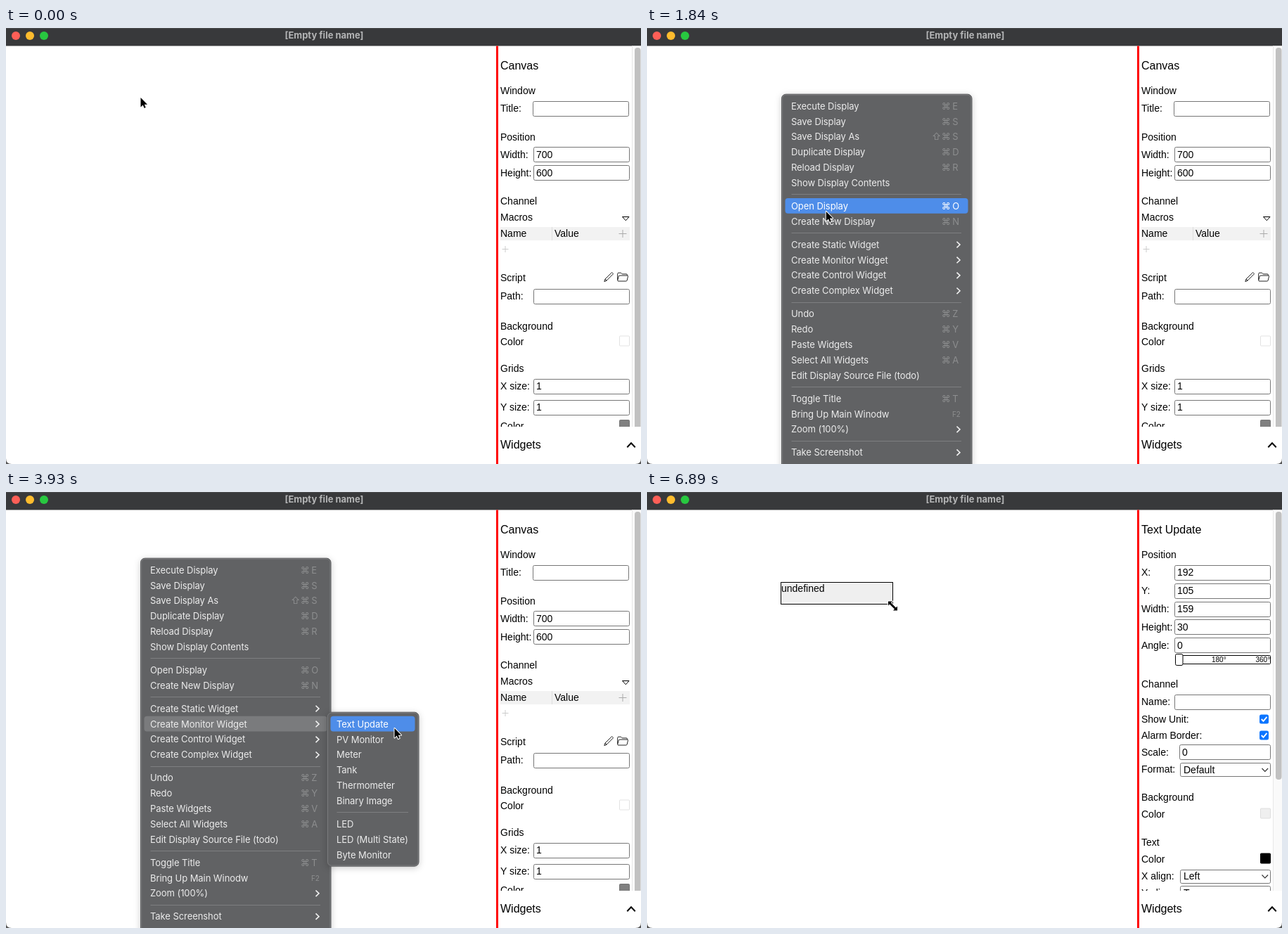
Write an HTML page that moves like this. It is 903 px wide and 620 px high and loops after 8 s.

```html
<!DOCTYPE html>
<html lang="en">
<head>
<meta charset="utf-8">
<title>Display editor</title>
<style>
  html, body { margin: 0; width: 100%; height: 100%; overflow: hidden; background: #fff; }
  svg { display: block; }
  text { white-space: pre; }
  .ui { font: 14px "Liberation Sans", Arial, sans-serif; }
  .menu { font: 13px Inter, "DejaVu Sans", sans-serif; letter-spacing: -.07px; fill: #ececec;
          filter: drop-shadow(0 2px 5px rgba(0, 0, 0, .2)); }
  .row rect { fill: none; }
  .row .key { fill: #8d8e8f; }
  .row.blue rect { fill: #4e8de9; }
  .row.gray rect { fill: #7a7b7d; }
  .row.blue, .row.blue .key { fill: #fff; }
</style>
</head>
<body>
<svg id="stage" width="903" height="620" viewBox="0 0 903 620"></svg>
<script>
const LOOP = 8000, STEP = 148, PITCH = 21.9, GAP = 10.93;
const stage = document.getElementById('stage');
const $ = id => document.getElementById(id);

// ---- drawing helpers (y is the vertical middle of a text line)
const text = (x, y, s, attrs = '', size = 14) =>
  `<text x="${x}" y="${y + size * .355}" ${attrs}>${s}</text>`;
const heading = (y, s) => text(703, y, s, 'font-size="16"', 16);
const labels = list => list.map(([y, s]) => text(703, y, s)).join('');
const rect = (x, y, w, h, attrs) =>
  `<rect x="${x}" y="${y}" width="${w}" height="${h}" ${attrs}/>`;
const line = (d, color, width = 1, attrs = '') =>
  `<path d="${d}" fill="none" stroke="${color}" stroke-width="${width}" ${attrs}/>`;
const plus = (x, y, r, color) => line(`M${x - r} ${y}h${2 * r}M${x} ${y - r}v${2 * r}`, color);
const field = (y, value = '', x = 750.5, id = '', right = 886.5) =>
  rect(x, Math.floor(y - 10.5) + .5, right - x, 21, 'rx="2" fill="#fff" stroke="#767676"') +
  text(x + 3.5, y, value, id && `id="${id}"`);
const select = (y, value) =>
  rect(758.5, Math.floor(y - 9.5) + .5, 128, 19, 'rx="2" fill="#fff" stroke="#767676"') +
  text(763, y, value) + line(`M874.5 ${y - 2}l4.3 4.3 4.3 -4.3`, '#333', 1.2);
const checkbox = y => rect(871, y - 6.5, 13, 13, 'rx="2.5" fill="#0a75ff"') +
  line(`M873.8 ${y}l2.7 2.8 5 -6`, '#fff', 1.9);
const swatch = (y, fill, stroke) =>
  rect(872.5, y, 14, 14, `rx="1" fill="${fill}" stroke="${stroke}"`);
const thumb = h => rect(894, 28, 8.5, h, 'rx="4" fill="#c1c1c1"');

const canvasPanel = () => heading(53.5, 'Canvas') +
  labels([[89.5, 'Window'], [114.5, 'Title:'], [155, 'Position'], [180, 'Width:'], [206, 'Height:'],
    [246.5, 'Channel'], [269.5, 'Macros'], [355, 'Script'], [381.5, 'Path:'], [424.5, 'Background'],
    [446.5, 'Color'], [484.5, 'Grids'], [509.5, 'X size:'], [539.5, 'Y size:'], [566, 'Color']]) +
  field(114.5, '', 749.5, '', 885.5) + field(180, 700) + field(206, 600) + field(381.5) +
  field(509.5, 1) + field(539.5, 1) +
  line('M876.5 268.5h9.5l-4.7 5.3z', '#000') +
  rect(703, 283, 184, 19, 'fill="#f2f2f2"') + line('M776.5 283v19', '#dedede') +
  text(703, 292.5, 'Name') + text(780, 292.5, 'Value') +
  plus(877, 292.5, 5.5, '#aaa') + plus(710, 314.5, 4.5, '#ccc') +
  line('M850.8 360.6l1.2 -3.6 9.6 -9.4 2 2 -9.5 9.6zM852 357l2.2 2.2', '#222') +
  line('M869.7 358.5v-9q0 -1.3 1.3 -1.3h3.6l1.6 1.7h6q1.2 0 1.2 1.2v1M869.7 358.8l1.6 -5.8q.3 -1 1.3 -1h10.8q1.4 0 1.1 1.3l-1.4 5.7q-.3 1 -1.4 1h-10.8q-1.2 0 -1.2 -1.2z', '#222') +
  swatch(438, '#fff', '#e3e3e3') + swatch(557.5, '#808080', '#747474') + thumb(560);

const widgetPanel = () => heading(53.5, 'Text Update') +
  labels([[89.5, 'Position'], [114.5, 'X:'], [140.5, 'Y:'], [166.5, 'Width:'], [192, 'Height:'],
    [218, 'Angle:'], [273.5, 'Channel'], [298.5, 'Name:'], [323, 'Show Unit:'], [346, 'Alarm Border:'],
    [370, 'Scale:'], [394.5, 'Format:'], [434.5, 'Background'], [458, 'Color'], [498.5, 'Text'],
    [522.5, 'Color'], [546.5, 'X align:'], [570, 'Y align:']]) +
  field(114.5, 192) + field(140.5, 105) + field(166.5, 159, 750.5, 'wide') +
  field(192, 30, 750.5, 'high') + field(218, 0) + field(298.5) + field(370, 0, 757.5) +
  rect(755.5, 232.5, 131, 12, 'rx="1" fill="#fff" stroke="#000"') +
  rect(751.5, 230.5, 10.5, 16, 'rx="2" fill="#fff" stroke="#000"') +
  text(803, 238, '180°', 'font-size="10"', 10) + text(865.5, 238, '360°', 'font-size="10"', 10) +
  checkbox(323) + checkbox(346) + select(395, 'Default') + select(546.5, 'Left') + select(570, 'Top') +
  swatch(450, '#efefef', '#dedede') + swatch(514, '#000', '#000') + thumb(381);

// Rows are "label|keys"; "-" is a separator and ">" opens a submenu.
function menu(id, x, top, w, rows) {
  const right = x + w;
  let y = top + 17, body = '';
  for (const item of rows) {
    if (item === '-') {
      body += line(`M${x + 14.5} ${Math.round(y - 6) + .5}H${right - 15}`, '#7e7f81');
      y += GAP;
      continue;
    }
    const [name, keys = ''] = item.split('|');
    body += `<g class="row" data-y="${y}">` + rect(x + 5.5, y - 11.3, w - 11, 21.8, 'rx="4"') +
      text(x + 14, y, name, '', 13);
    if (keys === '>') body += line(`M${right - 21.5} ${y - 4.3}l4.5 4.3 -4.5 4.3`, '#f0f0f0', 1.6);
    else if (keys === 'F2') body += text(right - 28, y + .5, keys, 'class="key" font-size="10"', 10);
    else [...keys].reverse().forEach((c, i) =>
      body += text(right - [27.8, 43.2, 57][i], y, c, 'class="key"', 13));
    body += '</g>';
    y += PITCH;
  }
  const h = y - PITCH + 15.8 - top;
  return `<g class="menu" id="${id}">` +
    rect(x + .5, top + .2, w - .5, h, 'rx="6" fill="#616264" stroke="#5a5b5d"') +
    rect(x + 1.5, top + 1.2, w - 2.5, h - 2, 'rx="5" fill="none" stroke="#7b7c7e"') + body + '</g>';
}

const mainRows = ['Execute Display|⌘E', 'Save Display|⌘S', 'Save Display As|⇧⌘S', 'Duplicate Display|⌘D',
  'Reload Display|⌘R', 'Show Display Contents', '-', 'Open Display|⌘O', 'Create New Display|⌘N', '-',
  'Create Static Widget|>', 'Create Monitor Widget|>', 'Create Control Widget|>',
  'Create Complex Widget|>', '-', 'Undo|⌘Z', 'Redo|⌘Y', 'Paste Widgets|⌘V', 'Select All Widgets|⌘A',
  'Edit Display Source File (todo)', '-', 'Toggle Title|⌘T', 'Bring Up Main Winodw|F2',
  'Zoom (100%)|>', '-', 'Take Screenshot|>', ''];
const staticRows = ['Label', 'Polyline', 'Arc', 'Rectangle', 'Media', 'Symbol', 'Text Symbol'];
const monitorRows = ['Text Update', 'PV Monitor', 'Meter', 'Tank', 'Thermometer', 'Binary Image', '-',
  'LED', 'LED (Multi State)', 'Byte Monitor'];

const outlined = 'stroke="#fff" stroke-width="2" stroke-linejoin="round" paint-order="stroke"';
stage.innerHTML = `
  <g class="ui">
    ${rect(0, 0, 903, 25.5, 'fill="#38393b"')}${line('M0 .5H903', '#4a4b4d')}
    ${['#fe5f57', '#febc2e', '#28c840'].map((c, i) =>
      `<circle cx="${14 + 20 * i}" cy="11" r="6" fill="${c}"/>`).join('')}
    ${text(452.5, 10.5, '[Empty file name]', 'text-anchor="middle" fill="#b4b5b6" font-family="Inter, sans-serif" font-weight="700" font-size="13"', 13)}
    <svg width="903" height="567">
      ${rect(890, 25.5, 13, 542, 'fill="#fafafa"')}${line('M890.5 25.5V567', '#e8e8e8')}
      <g id="canvasPanel">${canvasPanel()}</g>
      <g id="widgetPanel">${widgetPanel()}</g>
    </svg>
    ${rect(697, 25.5, 3, 595, 'fill="#f00"')}
    ${heading(592.5, 'Widgets')}
    ${line('M883.3 596.3l5.7 -6 5.7 6', '#000', 2)}
    <g id="widget">
      <rect id="box" x="190.5" y="128.5" fill="#efefef" stroke="#000"/>
      ${text(191, 137.5, 'undefined')}
    </g>
  </g>
  ${menu('main', 191, 94, 271, mainRows)}
  ${menu('static', 456, 291, 103.5, staticRows)}
  ${menu('monitor', 456, 313, 131, monitorRows)}
  <path d="M0 612q0 8 8 8h-8zM903 612q0 8 -8 8h8z" fill="#555"/>
  <g id="pointer">
    <path id="arrow" d="M.5 1V14.5L3.7 11.5 5.7 16 7.7 15.1 5.8 10.7H10Z" ${outlined}/>
    <path id="cross" d="M-6.5 0h13M0 -6.5v13" stroke="#000"/>
    <path id="resize" d="M-6.5 -6.5h6l-2 2 7 7 2 -2v6h-6l2 -2 -7 -7 -2 2z" ${outlined}/>
  </g>`;

// Pointer moves: start time, number of steps, end x, end y.
const moves = [[0, 1, 191, 98], [800, 2, 197, 104], [1400, 1, 214, 170], [1540, 7, 282, 322],
  [2590, 8, 544, 334], [3780, 2, 552, 335], [4680, 7, 190.5, 133.5], [5700, 1, 190.5, 130.5],
  [6000, 1, 194.5, 131.5], [6150, 6, 349.5, 162]];

function pointerAt(t) {
  const i = moves.findLastIndex(m => m[0] <= t);
  const [start, n, x, y] = moves[i], [, , fromX, fromY] = moves[Math.max(0, i - 1)];
  const k = Math.min(n, 1 + Math.floor((t - start) / STEP));
  const e = 1 - (1 - k / n) ** 1.6;
  return [fromX + (x - fromX) * e, fromY + (y - fromY) * e];
}

const show = (id, on) => $(id).style.display = on ? '' : 'none';
const menuRows = id => [...$(id).querySelectorAll('.row')];
const rowsOf = { main: menuRows('main'), monitor: menuRows('monitor') };
const hover = (id, y, tint) => rowsOf[id].forEach(r =>
  r.setAttribute('class', Math.abs(y - r.dataset.y) < 11 ? 'row ' + tint : 'row'));

function draw(t) {
  const [x, y] = pointerAt(t);
  const drawn = t >= 6150, fade = t >= 4530 ? .09 : 1;

  show('main', t >= 500 && t < 4680);
  show('static', t >= 2280 && t < 2428);
  show('monitor', t >= 2590 && t < 4680);
  $('main').style.opacity = $('monitor').style.opacity = fade;

  // The highlight trails a fast pointer.
  const lag = t < 1400 ? 0 : Math.max(0, (322 - y) * 9 / 152);
  const inside = t >= 2590 && x > 461;
  hover('main', t < 800 ? 0 : y - lag, inside ? 'gray' : 'blue');
  hover('monitor', inside ? y : 0, 'blue');

  show('arrow', t < 4680);
  show('cross', t >= 4680 && !drawn);
  show('resize', drawn);
  $('pointer').setAttribute('transform', `translate(${x} ${y})`);

  show('canvasPanel', !drawn);
  show('widgetPanel', drawn);
  show('widget', drawn);
  const w = Math.max(1, Math.round(x - 190.5)), h = Math.max(1, Math.round(y - 132));
  $('box').setAttribute('width', w);
  $('box').setAttribute('height', h + 1);
  $('wide').textContent = w;
  $('high').textContent = h;
}

const began = performance.now();
function tick() {
  draw((performance.now() - began) % LOOP);
  requestAnimationFrame(tick);
}
tick();
</script>
</body>
</html>
```
